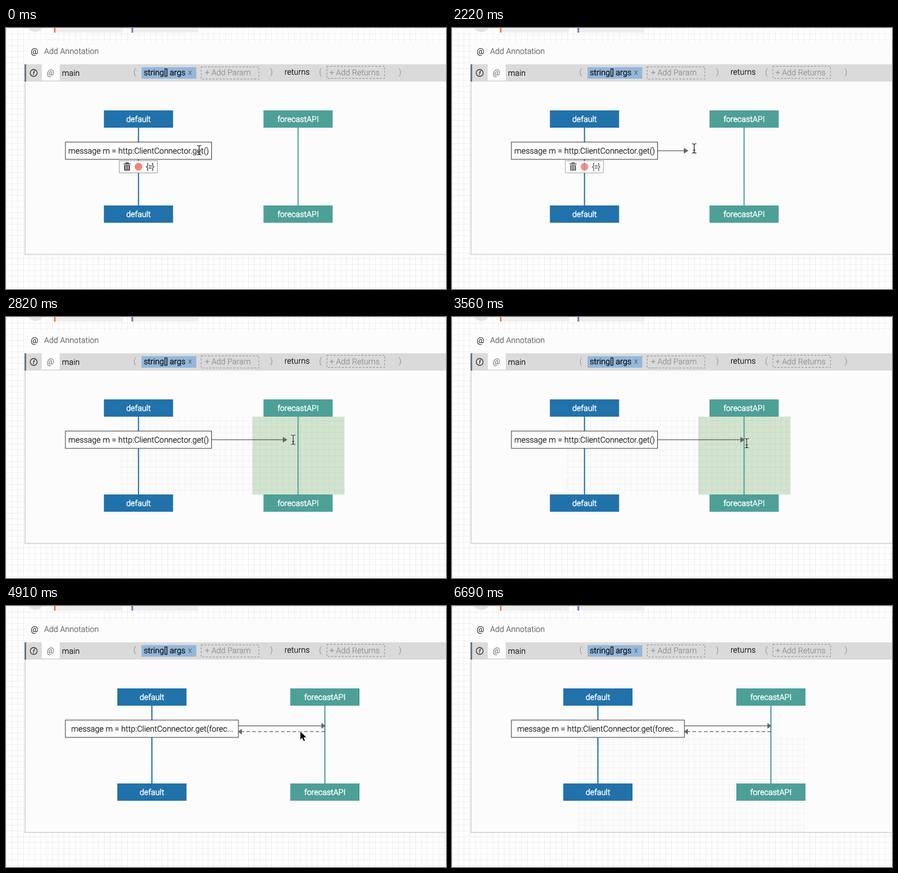
Recreate the animation shown at these times as an HTML page. Size 763 by 453 pixels, loop 7420 ms.

```html
<!DOCTYPE html>
<html lang="en">
<head>
<meta charset="utf-8">
<title>Connecting an action</title>
<style>
html, body { margin: 0; width: 100%; height: 100%; overflow: hidden; background: #fff; }
svg { display: block; font: 300 14px Roboto, sans-serif; text-rendering: geometricPrecision; }
text { stroke: #000; stroke-width: .2px; }
.grey { fill: #555; stroke: #555; }
.muted { fill: #8c8c8c; stroke: #8c8c8c; }
.strong { stroke-width: .4px; }
.lane text { fill: #fff; stroke: #fff; stroke-width: .6px; text-anchor: middle; }
.dash { fill: none; stroke: #888; stroke-dasharray: 3 3; }
.node { fill: #fff; stroke: #333; }
</style>
</head>
<body>
<svg id="stage" width="763" height="453" viewBox="0 0 763 453">
  <defs>
    <pattern id="grid" width="10" height="10" patternUnits="userSpaceOnUse">
      <path d="M0 .5H10M.5 0V10" stroke="#eee"/>
    </pattern>
    <pattern id="faint" width="10" height="10" patternUnits="userSpaceOnUse">
      <path d="M0 .5H10M.5 0V10" stroke="#000" stroke-opacity=".035"/>
    </pattern>
  </defs>

  <!-- page, tabs and panel -->
  <rect width="763" height="453" fill="url(#grid)"/>
  <circle cx="51" cy="-7" r="14" fill="#e4e4e4"/>
  <path d="M83 0H203V8H83ZM218 0H334V8H218Z" fill="#eee"/>
  <path d="M83 0H86V8H83Z" fill="#ee8449"/>
  <path d="M217.500 0H220.500V8H217.500Z" fill="#9268bd"/>
  <rect x="33" y="24" width="740" height="369" fill="#fcfcfc"/>
  <path d="M33 93V393H763" fill="none" stroke="#d9d9d9" stroke-width="2"/>
  <text x="43" y="45">@</text>
  <text class="grey" x="66" y="45">Add Annotation</text>

  <!-- function header -->
  <rect x="33" y="63" width="730" height="30" fill="#dadada"/>
  <rect x="32" y="63" width="3" height="30" fill="#5d7b88"/>
  <circle cx="48" cy="78" r="6" fill="none" stroke="#333" stroke-width="1.3"/>
  <text x="46.500" y="81.500" font-size="10" font-style="italic">f</text>
  <rect x="62" y="63" width="31" height="28" fill="#fff"/>
  <text class="grey" x="71" y="82" font-style="italic">@</text>
  <text x="97" y="83">main</text>
  <text class="muted" x="221" y="81">(</text>
  <rect x="235" y="68" width="95" height="20" fill="#92b8da"/>
  <text class="strong" x="239" y="82">string[] args</text>
  <text class="grey" x="316" y="81" font-size="13">x</text>
  <rect class="dash" x="338.5" y="67.5" width="100" height="21"/>
  <text class="muted" x="345" y="82">+ Add Param</text>
  <text class="muted" x="458" y="81">)</text>
  <text x="483" y="81">returns</text>
  <text class="muted" x="543" y="81">(</text>
  <rect class="dash" x="556.5" y="66.5" width="100" height="21"/>
  <text class="muted" x="561" y="82">+ Add Returns</text>
  <text class="muted" x="681" y="81">)</text>

  <!-- drop target -->
  <g id="target">
    <rect x="427" y="173" width="160" height="135" fill="#d2e4ce"/>
    <rect x="196" y="173" width="391" height="135" fill="url(#faint)"/>
  </g>
  <rect id="trace" x="219" y="229" width="392" height="163" fill="url(#faint)"/>

  <g id="left" class="lane">
    <path d="M0 173V308" stroke="#2172ab" stroke-width="2"/>
    <path d="M-60 143H60V173H-60ZM-60 308H60V338H-60Z" fill="#2172ab"/>
    <text y="163">default</text><text y="328">default</text>
  </g>
  <g id="right" class="lane">
    <path d="M0 173V308" stroke="#4da098" stroke-width="2"/>
    <path d="M-60 143H60V173H-60ZM-60 308H60V338H-60Z" fill="#4da098"/>
    <text y="163">forecastAPI</text><text y="328">forecastAPI</text>
  </g>

  <!-- action being edited -->
  <g id="editing">
    <rect class="node" x="103" y="198" width="253.500" height="30"/>
    <text x="108" y="218">message m = http:ClientConnector.get()</text>
  </g>

  <!-- connected action -->
  <g id="connected">
    <rect class="node" x="103" y="198" width="300" height="30"/>
    <text x="113" y="218">message m = http:ClientConnector.get(forec...</text>
    <path d="M403 208H548" stroke="#333"/>
    <path d="M553 218H409" stroke="#333" stroke-dasharray="6 4"/>
    <path d="M547 203L554 208L547 213ZM409 213L402 218L409 223Z" fill="#666"/>
  </g>

  <!-- action toolbar -->
  <g id="bar">
    <rect x="196.500" y="230.500" width="66" height="21" fill="#fff" stroke="#999"/>
    <path d="M204 236H216M208 235V234H212V235" fill="none" stroke="#333" stroke-width="1.6"/>
    <path d="M205 238H215V247.500H205Z" fill="#444"/>
    <path d="M207.500 239V246M210 239V246M212.500 239V246" stroke="#fff"/>
    <circle cx="229.700" cy="240.700" r="6.700" fill="#f4827b"/>
    <path d="M247 235H245.500V239.500L243.500 241L245.500 242.500V247H247M253 235H254.500V239.500L256.500 241L254.500 242.500V247H253M247.500 238.500H252.500M247.500 241H252.500M247.500 243.500H252.500" fill="none" stroke="#333" stroke-width="1.2"/>
  </g>

  <g id="arrow">
    <path id="shaft" stroke="#333"/>
    <path id="head" d="M-7 208L1 213L-7 218Z" fill="#666"/>
  </g>
  <circle id="handle" cx="357" cy="213" r="10" fill="#888" fill-opacity=".8"/>

  <!-- pointers, each drawn around its hot spot -->
  <g id="beam">
    <path d="M-4 -8H-2Q0 -8 0 -6Q0 -8 2 -8H4M0 -6V6M-4 8H-2Q0 8 0 6Q0 8 2 8H4M-2 3H2" fill="none" stroke="#fff" stroke-width="2.600"/>
    <path d="M-4 -8H-2Q0 -8 0 -6Q0 -8 2 -8H4M0 -6V6M-4 8H-2Q0 8 0 6Q0 8 2 8H4M-2 3H2" fill="none" stroke="#111" stroke-width="1.200"/>
  </g>
  <g id="wand">
    <path d="M3 3L12 12" stroke="#fff" stroke-width="4.500"/>
    <path d="M4 4L12 12" stroke="#111" stroke-width="3"/>
    <path d="M1 1L4 4" stroke="#f0dc55" stroke-width="2.500"/>
    <path d="M5 0V2M0 5H2" stroke="#fff"/>
  </g>
  <path id="pointer" d="M0 0V15.500L3.500 12.300L6 18L9 16.700L6.500 11.300H11.500Z" fill="#000" stroke="#fff"/>
</svg>
<script>
const LOOP = 7420;
// time, pointer kind, x, y, arrow tip, toolbar opacity
const steps = [
  [0, 'beam', 335, 212, 0, 1],
  [140, 'beam', 361, 218, 0, 1],
  [290, 'wand', 356, 213, 0, 1],
  [580, 'wand', 354, 212, 0, 1],
  [730, 'wand', 353, 211, 0, 1],
  [880, 'wand', 350, 209, 0, 1],
  [1170, 'wand', 353, 210, 0, 1],
  [2070, 'beam', 388, 211, 377, 1],
  [2220, 'beam', 420, 209, 409, .85],
  [2370, 'beam', 447, 211, 436, .7],
  [2520, 'beam', 466, 211, 455, 0],
  [2670, 'beam', 483, 212, 472, 0],
  [2820, 'beam', 498, 213, 487, 0],
  [2970, 'beam', 498, 214, 497, 0],
  [3120, 'beam', 508, 218, 504, 0],
  [3270, 'beam', 508, 218, 506, 0],
  [3560, 'beam', 511, 219, 507, 0],
  [4760, 'pointer', 510, 217, 507, 0],
  [4910, 'pointer', 510, 217, 0, 0],
  [5960, 'pointer', 493, 237, 0, 0],
  [6110, 'pointer', 494, 249, 0, .4],
  [6260, 'pointer', 494, 249, 0, .8],
  [6400, 'pointer', 598, 419, 0, 0],
  [6550, 'pointer', 663, 451, 0, 0],
  [6690, '', 0, 0, 0, 0]
];
const el = id => document.getElementById(id);
const show = (id, on) => el(id).setAttribute('visibility', on ? 'visible' : 'hidden');
const move = (id, x, y = 0) => el(id).setAttribute('transform', `translate(${x} ${y})`);

function draw(t) {
  const [, kind, x, y, tip, opacity] = steps.findLast(s => s[0] <= t);
  const linked = t >= 4910;

  move('left', linked ? 253 : 229.75);
  move('right', linked ? 553 : 506.5);
  show('editing', !linked);
  show('connected', linked);
  show('target', t >= 2370 && !linked);
  show('trace', t >= 6400);
  show('handle', t >= 290 && t < 2220);

  move('bar', linked ? 23 : 0);
  el('bar').setAttribute('opacity', opacity);

  show('arrow', tip > 0);
  el('shaft').setAttribute('d', `M357 213H${Math.max(357, tip - 5)}`);
  move('head', tip);

  for (const id of ['beam', 'wand', 'pointer']) show(id, id === kind);
  if (kind) move(kind, x, y);
}

const start = performance.now();
function tick() {
  draw((performance.now() - start) % LOOP);
  requestAnimationFrame(tick);
}
tick();
</script>
</body>
</html>
```
